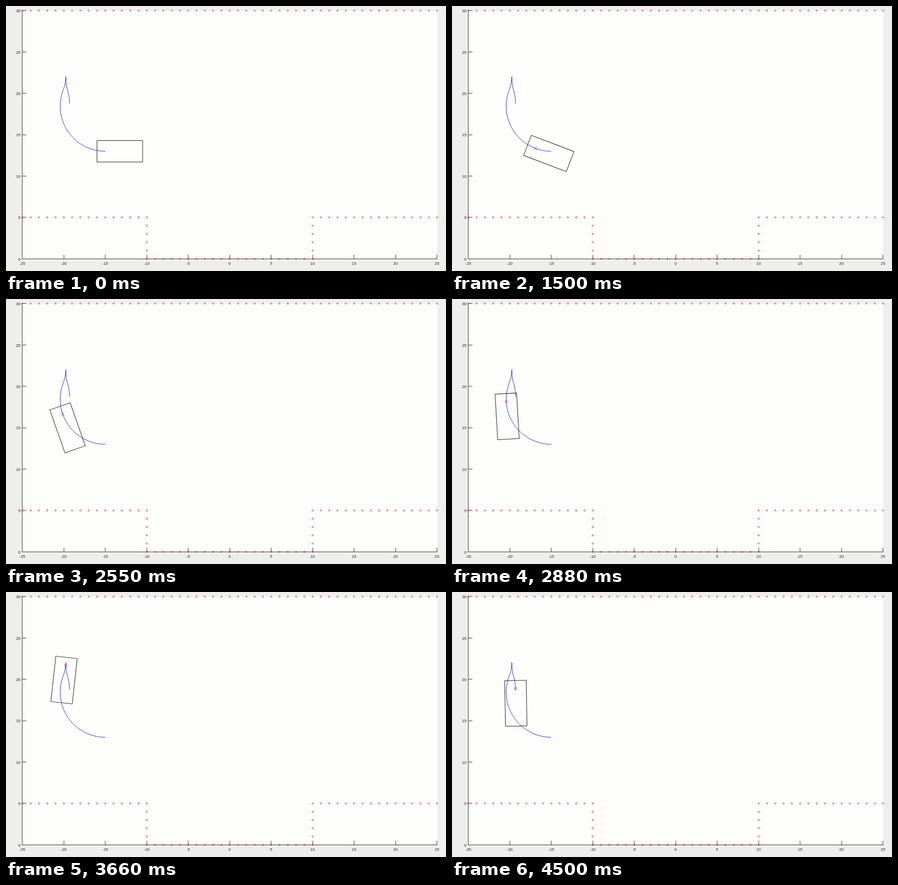
An HTML page that plays this animation: 854x515 px, repeating every 4.53 s.

```html
<!DOCTYPE html>
<html lang="en">
<head>
<meta charset="utf-8">
<title>Parking path</title>
<style>
  html, body { margin: 0; width: 100%; height: 100%; overflow: hidden; background: #eeeeed; }
  svg { display: block; }
  text { font: 8px "Liberation Sans", Arial, sans-serif; fill: #262626; }
  .axis { stroke: #3a3a3a; fill: none; }
  .dots { stroke: #d8392f; stroke-width: .9; fill: none; }
  .path { stroke: #2a2ac8; fill: none; }
  .car { stroke: #222; fill: none; }
  .mark { stroke: #d8242c; fill: none; }
</style>
</head>
<body>
<svg width="854" height="515" viewBox="0 0 854 515">
  <rect x="32" y="9" width="805" height="482" fill="#fdfdfc"/>
  <path id="axis" class="axis"/>
  <g id="labels"></g>
  <g id="dots" class="dots"></g>
  <path id="path" class="path"/>
  <g id="pose">
    <rect class="car" x="-16.1" y="-20.9" width="88.6" height="41.8"/>
  </g>
  <path id="mark" class="mark" d="M-3-3L3 3M-3 3L3-3"/>
</svg>
<script>
const $ = id => document.getElementById(id);
const px = x => 31.7 + 16.1 * (x + 25);
const py = y => 491.3 - 16.08 * y;

function add(parent, tag, attrs, text) {
  const el = document.createElementNS("http://www.w3.org/2000/svg", tag);
  for (const key in attrs) el.setAttribute(key, attrs[key]);
  if (text !== undefined) el.textContent = text;
  parent.appendChild(el);
}

// Axes, ticks and labels
let axis = "M31.5 9V491.5H837";
for (let x = -25; x <= 25; x += 5) {
  axis += `M${Math.floor(px(x)) + .5} 491.5v-8`;
  add($("labels"), "text", { x: px(x) - .2, y: 503, "text-anchor": "middle" }, x);
}
for (let y = 0; y <= 30; y += 5) {
  axis += `M31.5 ${Math.floor(py(y)) + .5}h8`;
  add($("labels"), "text", { x: 28.3, y: py(y) + 3.2, "text-anchor": "end" }, y);
}
$("axis").setAttribute("d", axis);

// Obstacle boundary
const dot = (x, y) => add($("dots"), "circle", { cx: px(x), cy: py(y), r: 1.4 });
for (let x = -25; x <= 25; x++) {
  dot(x, 30);
  dot(x, Math.abs(x) < 10 ? 0 : 5);
}
for (const x of [-10, 10]) for (let y = 0; y < 5; y++) dot(x, y);

// Arcs of the manoeuvre: sweep in degrees, gear, turn
const R = 87.5, RAD = Math.PI / 180;
const arcs = [[110.5, -1, 1], [18.4, -1, -1], [18.63, 1, -1], [16.53, 1, 1]];
const total = arcs.reduce((sum, a) => sum + a[0], 0);

function poseAt(u) {
  let x = 192.7, y = 282.3, deg = 0;
  for (const [sweep, gear, turn] of arcs) {
    const part = Math.min(u, sweep), a = deg * RAD;
    deg += turn * part;
    const b = deg * RAD;
    x += R * gear * turn * (Math.sin(b) - Math.sin(a));
    y += R * gear * turn * (Math.cos(a) - Math.cos(b));
    u -= part;
    if (u <= 0) break;
  }
  return { x, y, deg };
}

const points = [];
for (let i = 0; i <= 160; i++) {
  const p = poseAt(total * i / 160);
  points.push(p.x.toFixed(2) + " " + p.y.toFixed(2));
}
$("path").setAttribute("d", "M" + points.join("L"));

// Travel along the path: time in ms, degrees of arc
const START = 1110, LOOP = 4530, STEP = 30;
const keys = [[1110, 1.9], [1920, 41.3], [2550, 70.7], [3210, 102.6],
              [3660, 124.7], [3780, 130.4], [4320, 156], [4500, 163]];

function travel(t) {
  if (t < START) return 0;
  let i = 1;
  while (i < keys.length - 1 && t > keys[i][0]) i++;
  const [t0, u0] = keys[i - 1], [t1, u1] = keys[i];
  return u0 + (u1 - u0) * (t - t0) / (t1 - t0);
}

const begin = performance.now();
function draw() {
  const now = (performance.now() - begin) % LOOP;
  const t = Math.floor(now / STEP) * STEP;
  const { x, y, deg } = poseAt(travel(t));
  $("pose").setAttribute("transform", `translate(${x} ${y}) rotate(${deg})`);
  $("mark").setAttribute("transform", `translate(${x} ${y})`);
  $("mark").setAttribute("visibility", t < START ? "hidden" : "visible");
  requestAnimationFrame(draw);
}
draw();
</script>
</body>
</html>
```
